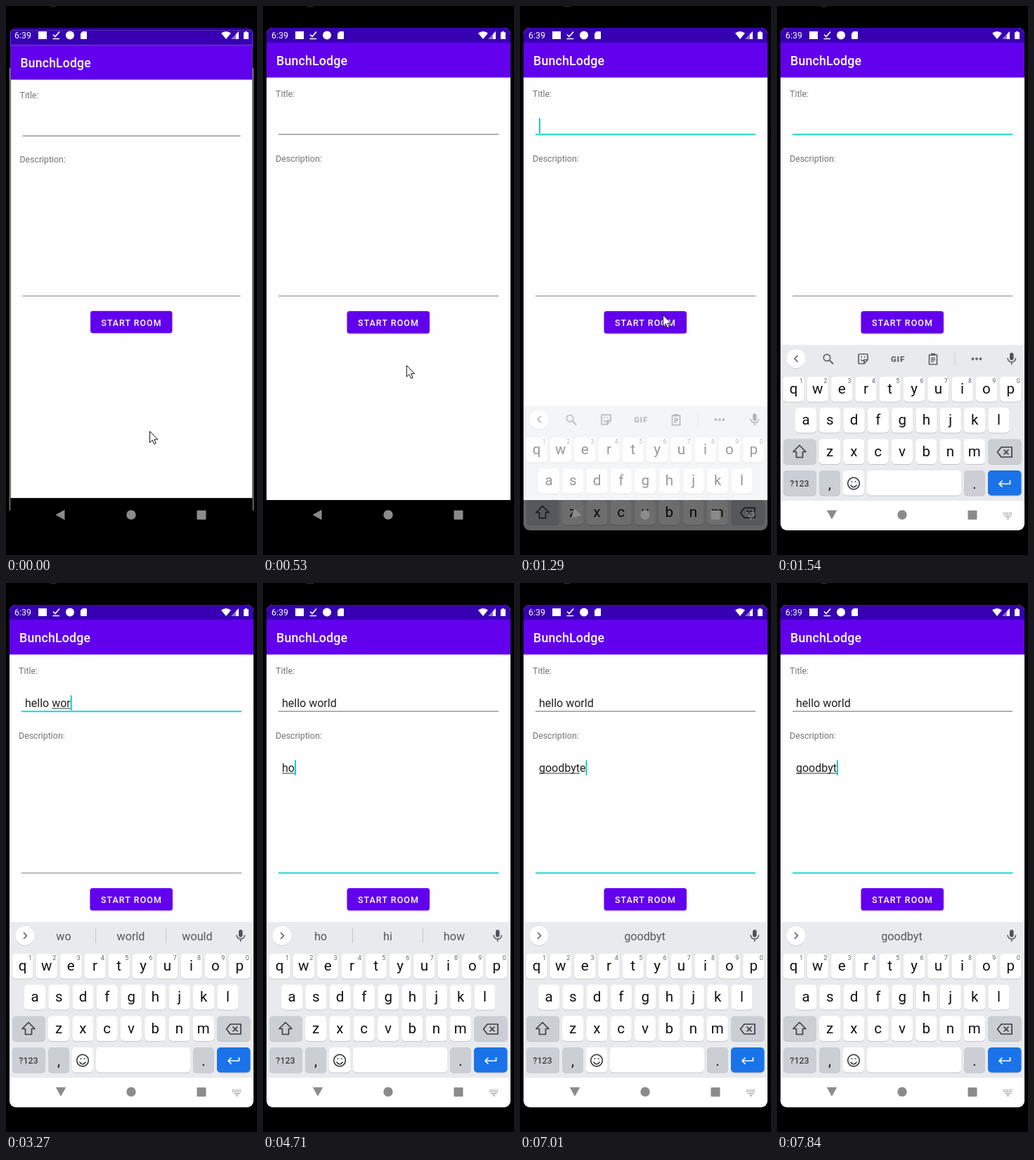
Recreate the animation shown at these times as an HTML page. Size 357 by 779 pixels, loop 8 s.

```html
<!DOCTYPE html>
<html lang="en">
<head>
<meta charset="utf-8">
<title>Room form</title>
<style>
html, body { margin: 0; width: 100%; height: 100%; overflow: hidden; background: #000; }
svg { display: block; width: 100vw; height: 100vh; font-family: Roboto, sans-serif; }
text { white-space: pre; }
.mid { text-anchor: middle; }
.label { font-size: 12.4px; fill: #757575; }
.field { font-size: 16px; fill: #212121; }
.key { font-size: 20.5px; fill: #111; }
.hint { font-size: 9px; fill: #5f6368; }
.word { font-size: 16.2px; fill: #54585d; }
.icon { fill: none; stroke: #5f6368; stroke-width: 1.7; stroke-linejoin: round; }
</style>
</head>
<body>
<svg viewBox="0 0 357 779" preserveAspectRatio="none">
  <defs>
    <clipPath id="screen"><rect x="5" y="31" width="347" height="713" rx="9"/></clipPath>
  </defs>
  <rect width="357" height="779"/>
  <ellipse cx="67" cy="0" rx="5" ry="1.5" fill="#252525"/>

  <g clip-path="url(#screen)">
    <g id="under">
      <rect x="5" y="31" width="347" height="26" fill="#2c008f"/>
      <path d="M5.5 88V716M351.5 88V716" stroke="#aaa79b"/>
    </g>
    <g id="win">
      <rect x="5" y="31" width="347" height="670" fill="#fefefe"/>
      <rect x="5" y="31" width="347" height="21" fill="#3700b3"/>
      <rect x="5" y="52" width="347" height="49.5" fill="#6200ee"/>
      <text x="19" y="84" font-size="17.7" font-weight="500" letter-spacing=".22" fill="#fff">BunchLodge</text>
      <text class="label" x="18" y="128.5">Title:</text>
      <text class="label" x="18" y="220.5">Description:</text>
      <path id="line0" d="M22 182.2H335"/>
      <path id="line1" d="M22 411.5H335"/>
      <rect x="119.5" y="434" width="117.5" height="32" rx="3.5" fill="#000" opacity=".18"/>
      <rect x="119.5" y="433" width="117.5" height="31.5" rx="3.5" fill="#6200ee"/>
      <text x="135" y="454" font-size="12.4" font-weight="500" letter-spacing="1.1" fill="#fff">START ROOM</text>
      <text id="text0" class="field" x="27" y="176"/>
      <text id="text1" class="field" x="27" y="268"/>
      <path id="mark" stroke="#333"/>
      <rect id="caret" width="2" height="21.5" fill="#12cfc4"/>
    </g>

    <g fill="#fff">
      <text x="12" y="46" font-size="12.4">6:39</text>
      <rect x="46" y="36" width="12" height="11"/>
      <path d="M67 40.5L70 43.5L76 36.5M66.500 46.500H76" fill="none" stroke="#fff" stroke-width="1.7"/>
      <circle cx="91" cy="41.500" r="6"/>
      <path d="M109 36H114Q115 36 115 37V46Q115 47 114 47H107Q106 47 106 46V39Z"/>
      <path d="M306 38.500Q313 33.500 320 38.500L313 47Z"/>
      <path d="M331 36V47H320Z" opacity=".45"/>
      <path d="M327 40V47H320ZM331 36V47H320L330 37Z" fill-rule="evenodd"/>
      <path d="M338 37.300H340V36H343V37.300H345V47H338Z"/>
    </g>

    <g id="kb">
      <rect x="5" y="481" width="347" height="222" fill="#e8eaed"/>
      <rect x="5" y="702" width="347" height="300" fill="#fff"/>
      <g id="keys"></g>
      <circle cx="27" cy="501.500" r="13.500" fill="#000" opacity=".12"/>
      <circle cx="27" cy="500.500" r="13.500" fill="#fff"/>
      <path id="chevron" class="icon"/>
      <g id="tools">
        <g class="icon">
          <circle cx="71" cy="499" r="4.700"/>
          <path d="M74.500 502.500L80 508" stroke-width="2"/>
          <path d="M117 494H128Q129 494 129 495V502L124 507.500H117Q116 507.500 116 506.500V495Q116 494 117 494ZM129 502H124V507M119 501.500Q122 505 124.500 502"/>
          <path d="M119.500 498H121M124 498H125.500" stroke-width="2"/>
          <path d="M216.500 495H227.500V508.500H216.500ZM219 499.500H225M219 502H225M219 504.500H223"/>
          <path d="M219 494.500H225" stroke-width="3.500"/>
        </g>
        <text class="mid" x="172" y="504.700" font-size="11.500" font-weight="900" letter-spacing=".8" fill="#5f6368">GIF</text>
        <path d="M253 491V511" stroke="#cdd0d4"/>
        <path d="M278.500 500.700h.01M284 500.700h.01M289.500 500.700h.01" stroke="#5f6368" stroke-width="3.800" stroke-linecap="round"/>
      </g>
      <g id="words">
        <path id="bars" d="M127.500 490V511M227.500 490V511" stroke="#c4c7cb"/>
        <text class="word mid" x="82" y="507"/>
        <text class="word mid" x="177.500" y="507"/>
        <text class="word mid" x="272" y="507"/>
      </g>
      <rect x="331" y="492" width="5.500" height="10.500" rx="2.700" fill="#505459"/>
      <path class="icon" d="M328 499.500Q328.500 505 333.700 505Q339 505 339.500 499.500M333.700 505V509"/>
    </g>

    <g fill="#8b8b8b">
      <path id="back" d="M70.500 722L83.500 714.700V729.300Z"/>
      <circle cx="178" cy="722" r="6.700"/>
      <rect x="271.500" y="715.700" width="13" height="13" rx="1"/>
      <g id="switcher" fill="none" stroke="#999">
        <path d="M322 719.500H335M322 722H335" stroke-width="1.500" stroke-dasharray="1.600 1"/>
        <path d="M324.500 724.600H332.500" stroke-width="1.300"/>
        <path d="M327 727.500H330" stroke-width="1.300"/>
      </g>
    </g>
  </g>
  <path id="mouse" d="M0 0V16L3.700 12.500L6.300 18.300L8.800 17.200L6.300 11.600H11.300Z" fill="#fff" stroke="#111"/>
</svg>

<script>
const LOOP = 8000;
const $ = id => document.getElementById(id);
const clamp = v => Math.max(0, Math.min(1, v));
const show = (el, on) => el.setAttribute('visibility', on ? 'inherit' : 'hidden');
const set = (el, attrs) => { for (const k in attrs) el.setAttribute(k, attrs[k]); };

function add(tag, attrs, content = '') {
  const el = document.createElementNS('http://www.w3.org/2000/svg', tag);
  set(el, attrs);
  el.textContent = content;
  $('keys').append(el);
}

function key(x, y, width, fill = '#fff') {
  const box = { x, width, height: 35.5, rx: 5 };
  add('rect', { ...box, y: y + 1, fill: '#000', opacity: .16 });
  add('rect', { ...box, y, fill });
}

function buildKeys() {
  const grey = '#cbced4', pitch = 34.3;
  [['qwertyuiop', 23.5, 526], ['asdfghjkl', 41, 570], ['zxcvbnm', 75, 614.5]].forEach(([row, x0, y], r) => {
    [...row].forEach((ch, i) => {
      const x = x0 + i * pitch;
      key(x - 15, y, 30);
      add('text', { class: 'key mid', x, y: y + 24 }, ch);
      if (r === 0) add('text', { class: 'hint mid', x: x + 11, y: 535 }, (i + 1) % 10);
    });
  });
  key(9, 614.5, 47, grey);
  key(300, 614.5, 47.5, grey);
  key(9, 659, 47, grey);
  key(60, 659, 30, grey);
  key(94, 659, 30);
  key(128, 659, 134);
  key(266, 659, 30, grey);
  key(300, 659, 47.5, '#1a73e8');
  add('text', { class: 'mid', x: 32, y: 682, 'font-size': 12.5, 'font-weight': 500, fill: '#3c4043' }, '?123');
  add('text', { class: 'key mid', x: 75, y: 685, 'font-size': 18 }, ',');
  add('text', { class: 'key mid', x: 281, y: 685 }, '.');
  const icon = (d, stroke = '#3c4043') => add('path', { class: 'icon', d, style: `stroke:${stroke}` });
  icon('M32 623.500L41 632.500H36.500V640.500H27.500V632.500H23Z');
  icon('M319 626H334V640H319L313.500 633ZM322.500 629.500L329.500 636.500M329.500 629.500L322.500 636.500');
  icon('M100.700 677.500a8.300 8.300 0 1 0 16.600 0a8.300 8.300 0 1 0 -16.600 0M104.500 679.500Q109 686 113.500 679.500');
  icon('M105.500 675H107.500M110.500 675H112.500');
  icon('M331.500 673V678H316.500M320.500 673.500L316 678L320.500 682.500', '#fff');
}

// Each step: time, then the values that change. "mark" is the underlined range.
const steps = [
  [0, { focus: -1, caret: 0, texts: ['', ''], mark: null, words: null }],
  [1060, { focus: 0, caret: 1 }],
  [1530, { caret: 0 }],
  [1890, { caret: 1 }],
  [2130, { title: 'h', mark: [0, 1] }],
  [2160, { words: ['h', 'hi', 'he'] }],
  [2220, { title: 'he', mark: [0, 2] }],
  [2310, { title: 'hel', mark: [0, 3], words: ['he', 'hey', 'hello'] }],
  [2400, { title: 'hell', mark: [0, 4], words: ['hel', 'hello', 'help'] }],
  [2490, { title: 'hello', mark: [0, 5], words: ['hell', 'hello', 'hello'] }],
  [2590, { title: 'hello ', mark: null, words: ['I', 'there', 'my'] }],
  [2680, { title: 'hello w', mark: [6, 7] }],
  [2860, { title: 'hello wo' }],
  [2890, { words: ['w', 'with', 'we'] }],
  [3050, { title: 'hello wor', mark: [6, 8] }],
  [3080, { words: ['wo', 'world', 'would'] }],
  [3270, { mark: [6, 9] }],
  [3300, { words: ['wor', 'world', 'work'] }],
  [3470, { title: 'hello worl', mark: [6, 10] }],
  [3590, { title: 'hello world', mark: [6, 11] }],
  [3710, { focus: 1, mark: null }],
  [3800, { words: null }],
  [4160, { desc: 'h', mark: [0, 1] }],
  [4220, { words: ['h', 'hi', 'how'] }],
  [4440, { desc: 'ho' }],
  [4710, { mark: [0, 2], words: ['ho', 'hi', 'how'] }],
  [4770, { desc: 'h', mark: [0, 1], words: ['h', 'hi', 'how'] }],
  [4890, { desc: '', mark: null }],
  [4920, { words: null }],
  [5100, { desc: 'g', mark: [0, 1] }],
  [5160, { words: ['g', 'good', 'go'] }],
  [5220, { desc: 'go', mark: [0, 2] }],
  [5310, { desc: 'goo', words: ['go', 'good', 'got'] }],
  [5530, { desc: 'good', mark: [0, 3] }],
  [5560, { words: ['goo', 'good', 'goods'] }],
  [5780, { mark: [0, 4], words: ['good', 'goodbye', 'going'] }],
  [6270, { caret: 0 }],
  [6670, { desc: 'goodb', caret: 1 }],
  [6820, { desc: 'goodby', mark: [0, 5] }],
  [6850, { words: ['goodb', 'goodbye', 'goodbyes'] }],
  [6920, { desc: 'goodbyt', mark: [0, 7] }],
  [6980, { words: ['', 'goodbyt', ''] }],
  [7010, { desc: 'goodbyte' }],
  [7180, { mark: [0, 8] }],
  [7240, { words: ['goodbyte', 'goodbye', 'goodbyes'] }],
  [7450, { desc: 'goodbyt', mark: [0, 7] }],
  [7480, { words: ['', 'goodbyt', ''] }],
];

const mousePath = [[0, 204, 603], [440, 204, 603], [860, 203, 172], [1070, 203, 172], [1180, 203, 306], [1360, 203, 520]];
const fields = [$('text0'), $('text1')], lines = [$('line0'), $('line1')];
const slots = [...document.querySelectorAll('.word')];

function drawState(s) {
  fields[0].textContent = s.title || '';
  fields[1].textContent = s.desc || '';
  lines.forEach((line, i) => {
    const on = s.focus === i;
    set(line, { stroke: on ? '#1ed5c9' : '#858585', 'stroke-width': on ? 1.9 : 1.2 });
  });
  const field = fields[Math.max(0, s.focus)], y = s.focus === 1 ? 268 : 176;
  const widthTo = n => n ? field.getSubStringLength(0, n) : 0;
  set($('caret'), { x: 27 + widthTo(field.textContent.length), y: y - 16.7 });
  show($('caret'), s.caret);
  const m = s.mark;
  set($('mark'), { d: m ? `M${27 + widthTo(m[0])} ${y + 2}H${27 + widthTo(m[1])}` : '' });
  show($('tools'), !s.words);
  show($('words'), s.words);
  if (s.words) {
    slots.forEach((el, i) => { el.textContent = s.words[i]; });
    show($('bars'), s.words[0]);
  }
  set($('chevron'), { d: s.words ? 'M25 496L29.500 500.500L25 505' : 'M29.500 496L25 500.500L29.500 505' });
}

function drawMouse(t) {
  const i = mousePath.findIndex(p => p[0] > t);
  show($('mouse'), i > 0);
  if (i < 1) return;
  const [a, b] = [mousePath[i - 1], mousePath[i]];
  const u = (t - a[0]) / (b[0] - a[0]);
  set($('mouse'), { transform: `translate(${a[1] + (b[1] - a[1]) * u + .5} ${a[2] + (b[2] - a[2]) * u + .5})` });
}

let lastStep = -1;
function draw(t) {
  let n = 0;
  while (n + 1 < steps.length && steps[n + 1][0] <= t) n++;
  if (n !== lastStep) {
    drawState(Object.assign({}, ...steps.slice(0, n + 1).map(s => s[1])));
    lastStep = n;
  }
  const open = 1 - (1 - clamp(t / 150)) ** 2;
  set($('win'), { transform: `translate(178.5 411) scale(${.99 + .01 * open}) translate(-178.5 -411)` });
  show($('under'), t < 150);

  const rise = clamp((t - 1120) / 400);
  set($('kb'), { transform: `translate(0 ${263 * (1 - rise) ** 2})`, opacity: rise });
  show($('kb'), rise > 0);
  show($('switcher'), rise > 0);
  set($('back'), { transform: `rotate(${-90 * clamp((t - 1190) / 200)} 77.5 721.5)` });
  drawMouse(t);
}

buildKeys();
const start = performance.now();
function frame() {
  draw((performance.now() - start) % LOOP);
  requestAnimationFrame(frame);
}
frame();
</script>
</body>
</html>
```
